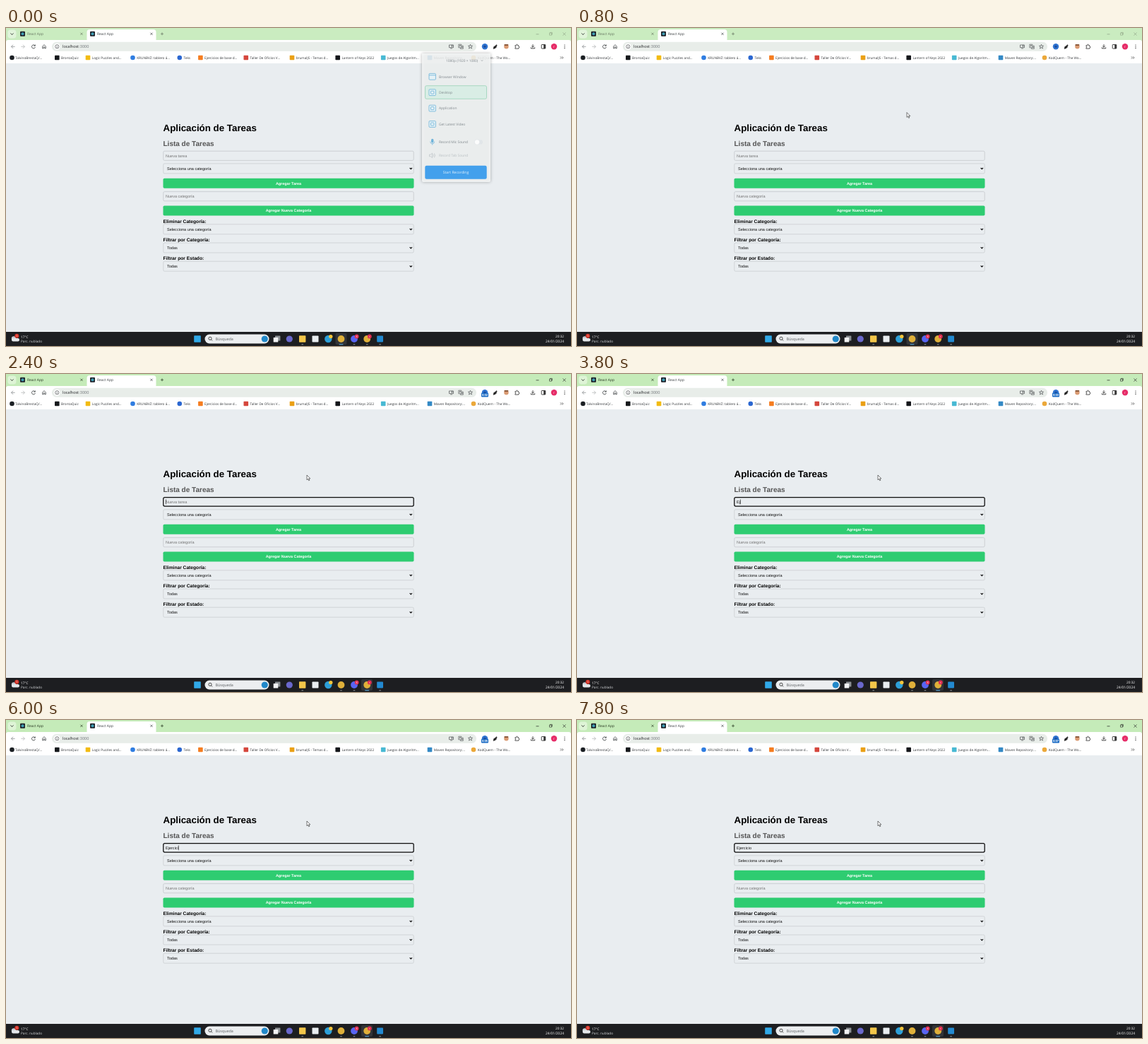
Write an HTML page with a canvas that moves like this. It is 800 px wide and 450 px high and loops after 8000 ms.

```html
<!DOCTYPE html>
<html lang="es">
<head>
<meta charset="utf-8">
<title>Aplicación de Tareas</title>
<style>
html, body { margin: 0; width: 100%; height: 100%; overflow: hidden; background: #e9edf0; }
canvas { display: block; width: 800px; height: 450px; }
</style>
</head>
<body>
<canvas id="stage"></canvas>
<script>
const LOOP = 8000, STEP = 200;
const UI = '"Open Sans", sans-serif', PAGE = '"Liberation Sans", Arial, sans-serif';
const canvas = document.getElementById('stage');
const ratio = window.devicePixelRatio || 1;
canvas.width = 800 * ratio;
canvas.height = 450 * ratio;
const c = canvas.getContext('2d');
c.textRendering = 'geometricPrecision';

// y is the middle of the capital letters
function text(str, x, y, size, color, { font = UI, weight = 400, align = 'left' } = {}) {
  c.font = `${weight} ${size}px ${font}`;
  c.textAlign = align;
  c.fillStyle = color;
  c.fillText(str, x, y + size * 0.36);
}
function box(x, y, w, h, r, fill, stroke, width = 0.6) {
  c.beginPath();
  c.roundRect(x, y, w, h, r);
  if (fill) { c.fillStyle = fill; c.fill(); }
  if (stroke) { c.strokeStyle = stroke; c.lineWidth = width; c.stroke(); }
}
function square(x, y, size, color) { box(x - size / 2, y - size / 2, size, size, 0.8, color); }
function circle(x, y, r, fill, stroke, width = 0.8) {
  c.beginPath();
  c.arc(x, y, r, 0, Math.PI * 2);
  if (fill) { c.fillStyle = fill; c.fill(); }
  if (stroke) { c.strokeStyle = stroke; c.lineWidth = width; c.stroke(); }
}
// Strokes an SVG path placed at x, y
function icon(path, x, y, color, width = 0.8, fill) {
  c.save();
  c.translate(x, y);
  const p = new Path2D(path);
  if (fill) { c.fillStyle = fill; c.fill(p); }
  c.strokeStyle = color;
  c.lineWidth = width;
  c.lineJoin = 'round';
  c.stroke(p);
  c.restore();
}

function tabs(active) {
  box(0, 0, 800, 20, 0, active ? '#c5ebb9' : '#caecc0');
  const ink = active ? '#26351f' : '#66755f';
  box(2.5, 2.5, 12, 12, 4, active ? '#def4d6' : '#e1f4db');
  icon('M-2-1L0 1L2-1', 8.5, 8.5, '#222', 0.9);
  box(114.5, 2, 98, 18, 4, '#fff');
  [[20, ink], [119, '#3c4043']].forEach(([x, color]) => {
    box(x, 4.8, 7, 7, 1, '#20252d');
    circle(x + 3.5, 8.3, 2, '#3f9fb6');
    text('React App', x + 10, 8.4, 4.9, color);
    icon('M-1.6-1.6L1.6 1.6M1.6-1.6L-1.6 1.6', x + 87, 8.3, color, 0.7);
  });
  icon('M-2 0H2M0-2V2', 221, 8.3, ink, 0.7);
  const control = active ? '#222' : '#8da184';
  icon('M-2 0H2', 752.5, 8.8, control, 0.7);
  icon('M-1.5-1.5H1.5V1.5H-1.5ZM-.6-1.5V-2.3H2.3V.6H1.5', 771, 8.6, control, 0.6);
  icon('M-2-2L2 2M2-2L-2 2', 790.5, 8.5, control, 0.7);
}

function toolbar(badge) {
  box(0, 17, 800, 33, [3, 3, 0, 0], '#fff');
  const ink = '#4a4d50';
  icon('M2.6 0H-2.5M0-2.5L-2.5 0L0 2.5', 10, 26.3, '#8a8d90');
  icon('M-2.6 0H2.5M0-2.5L2.5 0L0 2.5', 24, 26.3, '#b4b6b8');
  icon('M2-1.4A2.5 2.5 0 1 0 2.4 .8M2.3-2.8V-1H.5', 39, 26.3, ink, 0.9);
  icon('M-2.3 2.6V-.5L0-2.6L2.3-.5V2.6H.8V.6H-.8V2.6Z', 54, 26.3, ink, 0.8);
  box(65, 19.8, 601, 13, 6.5, '#e8ede9');
  circle(72.3, 26.3, 4.6, '#fff');
  circle(72.3, 26.3, 2.6, null, ink, 0.7);
  icon('M0-.3V1.5M0-1.5V-.9', 72.3, 26.3, ink, 0.7);
  text('localhost', 80, 26.2, 5.5, '#202124');
  text(':3000', 103.3, 26.2, 5.5, '#6a6f73');

  icon('M-3-2.2H3V1.5H-3ZM-1.4 2.7H1.4M1-2.5V0M0-.8L1 .2L2-.8', 630.5, 26.2, ink, 0.7);
  icon('M-3.2-3H.8V1.6H-3.2ZM.8-1H3.3V3.2H-.6V1.6M-2.3-1.5H0M-1.2-2.2Q-1 0-2.4.7M1.2 2.1L2 0L2.8 2.1', 644, 26.2, ink, 0.6);
  icon('M0-3L.9-1H3L1.3.4L2 2.7L0 1.4L-2 2.7L-1.3.4L-3-1H-.9Z', 657.5, 26.3, ink, 0.7);

  circle(678, 26.3, 4.2, '#2f74d0');
  circle(678, 26.3, 1.7, '#1c4b9b');
  if (badge) {
    box(673, 26.8, 10, 5.6, 1, '#1769c4');
    text(badge, 678, 29.6, 4.1, '#fff', { weight: 700, align: 'center' });
  }
  icon('M-2.7 2.7L-2-.1L1-2L2 0L0 2Z', 692.7, 26.7, '#222', 0.5, '#222');
  icon('M1.2-1.2L2.3-2.3', 692.7, 26.3, '#222', 2);
  circle(708.4, 26.3, 3.2, '#d99a72');
  box(705.4, 22.9, 6, 2, 1, '#8b5a3c');
  icon('M-2.6-1.5H-.8C-1.5-3.6 1.5-3.6.8-1.5H2.3V0C4 0 4 1.8 2.3 1.8V3H-2.6V1.6C-1.2 1.6-1.2-.1-2.6-.1Z', 723.5, 26.2, '#333', 0.8);
  icon('M0-3V1M-1.8-.7L0 1.1L1.8-.7M-2.7 1.2V2.7H2.7V1.2', 746, 26.2, '#333', 0.9);
  box(758.2, 23.5, 5.6, 5.6, 0.6, null, '#333', 0.9);
  box(761.2, 23.5, 2.6, 5.6, 0, '#333');
  circle(776, 26.3, 4.2, '#e62c68');
  text('r', 776, 26, 4.3, '#fff', { align: 'center' });
  [-2.2, 0, 2.2].forEach(d => circle(791, 26.3 + d, 0.65, '#333'));

  const marks = [
    [8.5, 'TalvinoBrestaQ/...', '#1b1f23', 1], [72.3, 'BrontaQuiz', '#16191c'],
    [116, 'Logic Puzzles and...', '#f2bb13'], [179.5, 'KRUNBVZ: tablero á...', '#2f7de1', 1],
    [245.8, 'Teks', '#2b67d1', 1], [275.4, 'Ejercicios de base d...', '#f57d20'],
    [339.8, 'Taller De Oficios V...', '#d5473d'], [405, 'brumalJS - Temas d...', '#eaa016'],
    [469.7, 'Lantern of Keys 2022', '#15171b'], [534.2, 'Juegos de Algoritm...', '#48b9d3'],
    [600, 'Maven Repository:...', '#3489c5'], [662, 'KodQuern - The Wo...', '#eba83a', 1]
  ];
  marks.forEach(([x, label, color, round]) => {
    if (round) circle(x, 42, 3.3, color);
    else square(x, 42, 6.6, color);
    text(label, x + (x < 10 ? 4.5 : 5.7), 41.9, 4.7, '#333639');
  });
  icon('M-2-1.6L-.4 0L-2 1.6M.4-1.6L2 0L.4 1.6', 787, 42, '#333', 0.7);
}

function field(y, label, color = '#757575') {
  box(222.8, y, 354.4, 13.2, 1.7, '#e9edf0', '#b9bdc1');
  text(label, 226, y + 6.7, 5.55, color, { font: PAGE });
}
function select(y, label) {
  box(222.8, y, 354.4, 14, 1.7, '#e9edf0', '#bfc3c7');
  text(label, 228, y + 7, 5.55, '#111', { font: PAGE });
  icon('M-1.6-.9L0 .8L1.6-.9', 573.3, y + 7, '#000', 1.1);
}
function button(y, label) {
  box(222.5, y, 355, 14, 1.8, '#2ecc71');
  text(label, 400, y + 7, 5.4, '#fff', { font: PAGE, weight: 700, align: 'center' });
}

function page(focused, typed, caret) {
  box(0, 50, 800, 380, 0, '#e9edf0');
  const bold = { font: PAGE, weight: 700 };
  text('Aplicación de Tareas', 222.5, 141.4, 13.33, '#000', bold);
  text('Lista de Tareas', 222.5, 163.6, 10, '#555', bold);
  field(174.2, typed || 'Nueva tarea', typed ? '#111' : '#757575');
  if (focused) box(222.8, 174.5, 354.4, 12.6, 2, null, '#101010', 1.25);
  if (caret) {
    c.font = `5.55px ${PAGE}`;
    box(226 + c.measureText(typed).width, 177.6, 0.6, 6.6, 0, '#000');
  }
  select(191.9, 'Selecciona una categoría');
  button(212.8, 'Agregar Tarea');
  field(231.6, 'Nueva categoría');
  button(251.5, 'Agregar Nueva Categoría');
  text('Eliminar Categoría:', 222.5, 273.4, 6.67, '#000', bold);
  select(277.8, 'Selecciona una categoría');
  text('Filtrar por Categoría:', 222.5, 299.7, 6.67, '#000', bold);
  select(304, 'Todas');
  text('Filtrar por Estado:', 222.5, 326, 6.67, '#000', bold);
  select(330.2, 'Todas');
}

function taskbar(active) {
  box(0, 430, 800, 20, 0, '#1d1e21');
  circle(11, 439.5, 3.2, '#c9ced4');
  box(8, 439, 11, 4.5, 2.2, '#e4e7ea');
  circle(15.3, 435.8, 3, '#d9372c');
  text('1', 15.3, 435.7, 3.8, '#fff', { align: 'center' });
  text('17°C', 21, 436.8, 4.8, '#fff');
  text('Parc. nublado', 21, 443.2, 4.7, '#d4d6d9');

  square(271, 440, 9.6, '#31a9e8');
  box(281.5, 433.5, 91, 13, 6.5, '#eceef0');
  circle(289, 439.3, 2.1, null, '#222', 0.8);
  icon('M0 0L1.6 1.6', 290.5, 440.8, '#222', 0.8);
  text('Búsqueda', 296.5, 440, 5.4, '#5a5e62');
  circle(366.3, 440, 4.6, '#2188c9');

  box((active ? 511 : 474.5) - 8, 432, 16, 16, 2, '#323438');
  box(381, 435.5, 7.4, 7, 0.5, '#8d9195');
  box(378.7, 438, 6.6, 6.4, 0.5, '#f2f3f4');
  circle(401.3, 440, 4.6, '#6a68cc');
  square(419.7, 440, 9.4, '#f3c64a');
  square(438, 440, 9, '#e9edf0');
  circle(456.3, 440, 5.2, '#2d9fd8');
  circle(459.8, 436.6, 2.7, '#f2c43b');
  circle(474.5, 440, 4.9, '#dfb03a');
  circle(493, 440, 4.9, '#5865f2');
  circle(511.2, 440, 4.9, '#dfb03a');
  [[496.6, '8'], [514.8, 'r']].forEach(([x, mark]) => {
    circle(x, 436.5, 2.9, '#e12d52');
    text(mark, x, 436.4, 3.7, '#fff', { align: 'center' });
  });
  square(529.6, 440, 8.8, '#2389d0');
  [419.7, 474.5, 493, 511.2, 529.6].forEach(x => {
    const on = x === (active ? 511.2 : 474.5);
    box(x - (on ? 3 : 1.4), 447.3, on ? 6 : 2.8, 1, 0.5, on ? '#62b8ee' : '#94989c');
  });
  text('20:32', 790, 436.6, 4.7, '#fff', { align: 'right' });
  text('24/01/2024', 790, 443.2, 4.9, '#fff', { align: 'right' });
}

function popup() {
  c.save();
  c.globalAlpha = 0.85;
  c.shadowColor = 'rgba(0,0,0,.35)';
  c.shadowBlur = 4 * ratio;
  box(589, 36, 97, 182, [0, 0, 2, 2], '#f7f9fa');
  c.shadowColor = 'transparent';
  const ink = '#6f777c', blue = '#66afd6';
  text('1080p (1920 × 1080)', 623, 46.2, 4.8, ink);
  icon('M-1.3-.7L0 .7L1.3-.7', 674, 46, ink, 0.6);
  box(593.5, 81.7, 87, 18.6, 2, '#d6eee4', '#8dcfb0', 0.8);
  ['Browser Window', 'Desktop', 'Application', 'Get Latest Video'].forEach((label, i) => {
    const y = 68.8 + i * 22.4;
    box(599, y - 4.4, 9.4, 8.8, 1, '#e4f1f7', blue, 0.9);
    if (i) box(601.5, y - 2, 4.4, 4, 0.6, null, blue, 0.9);
    else icon('M0 0H9.4', 599, y - 2, blue, 0.9);
    text(label, 613, y, 4.9, ink);
  });
  box(602, 156.8, 3.4, 5.6, 1.7, '#5aa9d6');
  icon('M-3-1Q-3 2.2 0 2.2Q3 2.2 3-1M0 2.2V4', 603.7, 161.6, '#5aa9d6', 0.7);
  text('Record Mic Sound', 613, 161.4, 4.9, ink);
  box(663, 158.5, 12, 6, 3, '#dfe4e7');
  circle(667, 161.5, 3.7, '#fff', '#d5dadd', 0.5);
  icon('M-4-1.4H-2L0-3.3V3.3L-2 1.4H-4ZM1.4-1.8Q3 0 1.4 1.8M2.8-3Q5.4 0 2.8 3', 603.5, 180.4, '#b9c0c4', 0.8);
  text('Record Tab Sound', 613, 180.4, 4.9, '#b0b7bb');
  c.globalAlpha = 1;
  box(593.3, 194.7, 87.4, 19, 2.2, '#43a0ec');
  text('Start Recording', 637, 204.2, 5.1, '#e8f4fd', { align: 'center' });
  c.restore();
}

const ease = p => p * p * (3 - 2 * p);
function pointerAt(t) {
  const stops = [[400, 622, 57], [1200, 312, 182], [1400, 312, 182], [2000, 426, 143]];
  if (t <= 400) return [622, 57];
  for (let i = 1; i < stops.length; i++) {
    const [t0, x0, y0] = stops[i - 1], [t1, x1, y1] = stops[i];
    if (t < t1) {
      const p = ease((t - t0) / (t1 - t0));
      return [x0 + (x1 - x0) * p, y0 + (y1 - y0) * p];
    }
  }
  return [426, 143];
}
function pointer(t) {
  const [x, y] = pointerAt(t);
  const overField = y > 174 && y < 188;
  if (overField) icon('M-1.6-3.3H-.4L0-3L.4-3.3H1.6M0-3V3M-1.6 3.3H-.4L0 3L.4 3.3H1.6', x + 0.3, y + 0.6, '#222', 0.7);
  else icon('M0 0V6.9L1.6 5.4L2.7 7.9L3.8 7.4L2.7 5H4.8Z', x, y, '#222', 0.6, '#fff');
}

const passed = (times, t) => times.filter(at => t >= at).length;
const KEYS = [3400, 3800, 4000, 4200, 4400, 4600, 4800, 5000, 6600];
const TICKS = [1400, 2400, 3400, 4400, 5600, 6600, 7400];
const BLINKS = [1200, 1800, 2400, 3000, 3400, 5600, 6000, 7000, 7400, 7800];

function draw(t) {
  c.setTransform(ratio, 0, 0, ratio, 0, 0);
  const active = t >= 1200;
  const seconds = passed(TICKS, t);
  tabs(active);
  toolbar(seconds ? '0:0' + seconds : '');
  page(active, 'Ejercicio'.slice(0, passed(KEYS, t)), passed(BLINKS, t) % 2 === 1);
  taskbar(active);
  if (t < 200) popup();
  else pointer(t);
}

const start = performance.now();
function tick() {
  const t = (performance.now() - start) % LOOP;
  draw(Math.floor(t / STEP) * STEP);
  requestAnimationFrame(tick);
}
tick();
</script>
</body>
</html>
```
